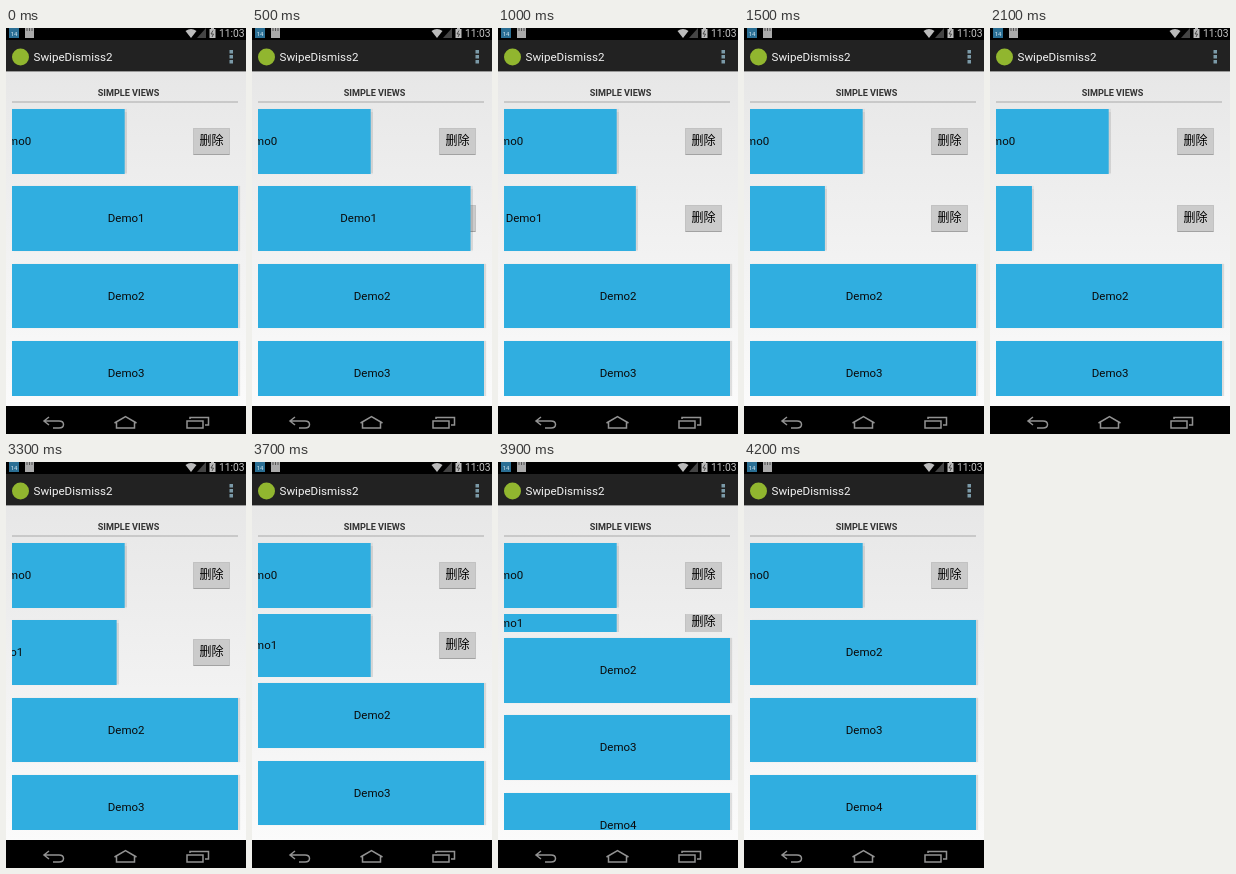
An HTML page for the animation above (4250 ms loop, 240 by 406 pixels).

```html
<!DOCTYPE html>
<html lang="en">
<head>
<meta charset="utf-8">
<title>Swipe to dismiss</title>
<style>
html, body { margin: 0; width: 100%; height: 100%; overflow: hidden; background: #000; }
#stage { position: relative; width: 240px; height: 406px; overflow: hidden; font-family: Roboto, "Noto Sans CJK SC", "Noto Sans CJK", sans-serif; }
svg { position: absolute; left: 0; top: 0; }
#list { position: absolute; left: 6px; top: 74.7px; width: 234px; height: 293.3px; overflow: hidden; }
.row { position: relative; height: 77.33px; overflow: hidden; }
.body { position: absolute; left: 0; top: 50%; width: 234px; height: 64.6px; margin-top: -32.3px; }
.button {
  position: absolute; left: 181px; top: 18.8px; width: 37px; height: 27px; box-sizing: border-box;
  border: 1px solid #c2c2c2; border-bottom-color: #a2a2a2; border-radius: 1px; background: #cbcbcb;
  font-size: 12px; line-height: 25px; text-align: center; color: #000;
}
.card {
  position: absolute; left: 0; top: 0; width: 226.3px; height: 100%; background: #30aee0;
  box-shadow: 2px 0 1px #0000001c; font-size: 11.5px; line-height: 65px; text-align: center; text-indent: 2px; color: #0a0a0a;
}
</style>
</head>
<body>
<div id="stage">
  <svg width="240" height="406" viewBox="0 0 240 406">
    <defs>
      <linearGradient id="page" x2="0" y2="1"><stop stop-color="#e7e7e7"/><stop offset="1" stop-color="#fbfbfb"/></linearGradient>
    </defs>
    <rect width="240" height="406"/>
    <rect y="43" width="240" height="335" fill="url(#page)"/>
    <rect y="12" width="240" height="31" fill="#222"/>
    <rect y="43" width="240" height="1" fill="#999"/>

    <!-- status bar -->
    <rect x="3" y="0" width="10" height="10" fill="#2b6f94"/>
    <text x="8" y="8" font-size="6" text-anchor="middle" fill="#d5e8f0">14</text>
    <path d="M19 0h9v10h-9z" fill="#aaa"/>
    <path d="M21 0v3M23.5 0v3M26 0v3" stroke="#555"/>
    <path d="M179.500 3Q185 -1 190.500 3L185 10z" fill="#bbb"/>
    <path d="M200 0V10H191z" fill="#444"/>
    <path d="M205 0h3v1h1.500v9h-6V1h1.500z" fill="#bbb"/>
    <path d="M207 2.500l-2 3.500h2.500l-1.500 3" fill="none" stroke="#333" stroke-width=".8"/>
    <text x="213" y="9" font-size="10.3" fill="#c4c4c4">11:03</text>

    <!-- action bar -->
    <circle cx="14.500" cy="29" r="8.500" fill="#91b62f"/>
    <text x="27.500" y="32.500" font-size="11.6" fill="#f3f3f3">SwipeDismiss2</text>
    <path d="M223.500 22h3.500v3.500h-3.500zM223.500 27h3.500v3.500h-3.500zM223.500 32h3.500v3.500h-3.500z" fill="#7b9aa8"/>

    <text x="122.500" y="68" font-size="9.1" font-weight="700" text-anchor="middle" fill="#333">SIMPLE VIEWS</text>
    <rect x="6" y="73.500" width="226" height="1" fill="#aaa"/>

    <!-- navigation bar -->
    <g fill="none" stroke="#929292" stroke-width="1.500">
      <path d="M43 389L38 393L43 397M38 393H53Q57.500 393 57.500 396.500T53 400H47"/>
      <path d="M108.500 395L119.500 388.500L130.500 395M110.500 394.500V400H128.500V394.500"/>
      <path d="M181 393H197V400H181zM184 391V389.500H202.500V397H199"/>
    </g>
  </svg>
  <div id="list"></div>
</div>
<script>
const LOOP = 4250, ROW = 77.33, OPEN = -113.3;
const list = document.getElementById("list");

const rows = [0, 1, 2, 3, 4].map(i => {
  const row = document.createElement("div");
  row.className = "row";
  row.innerHTML = `<div class="body"><div class="button">删除</div><div class="card">Demo${i}</div></div>`;
  list.append(row);
  return row;
});
const slide = (row, x) => row.querySelector(".card").style.transform = `translateX(${x}px)`;

// time, card offset and speed along the drag
const drag = [
  [300, 0, 0], [1000, -94, -.13], [1500, -151, -.085], [2100, -190, -.055],
  [2850, -224.7, -.02], [2950, -226.3, 0], [3050, -226.3, 0], [3350, OPEN, 0]
];

function offset(t) {
  if (t <= drag[0][0]) return 0;
  const i = drag.findIndex(k => k[0] > t);
  if (i < 0) return OPEN;
  const [t0, x0, v0] = drag[i - 1], [t1, x1, v1] = drag[i];
  const d = t1 - t0, u = (t - t0) / d, w = 1 - u;
  return w * w * ((1 + 2 * u) * x0 + u * d * v0) + u * u * ((3 - 2 * u) * x1 - w * d * v1);
}

function collapse(t) {
  const u = Math.min(1, Math.max(0, (t - 3560) / 500));
  return (1 - Math.cos(Math.PI * u)) / 2;
}

function draw() {
  const t = performance.now() % LOOP;
  slide(rows[1], offset(t));
  rows[1].style.height = ROW * (1 - collapse(t)) + "px";
  requestAnimationFrame(draw);
}

slide(rows[0], OPEN);
draw();
</script>
</body>
</html>
```
